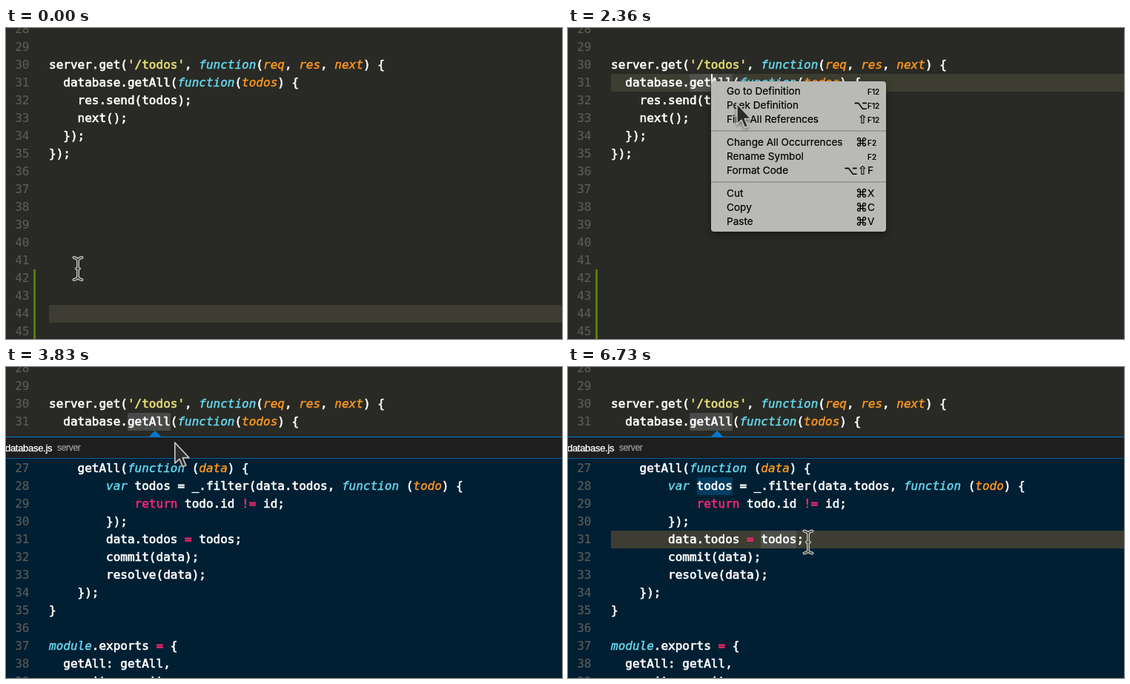
An HTML page for the animation above (6930 ms loop, 750 by 420 pixels).

```html
<!DOCTYPE html>
<html lang="en">
<head>
<meta charset="utf-8">
<title>Peek definition</title>
<style>
  html, body { margin: 0; width: 100%; height: 100%; overflow: hidden; background: #272822; }
  #stage { position: relative; width: 750px; height: 420px; overflow: hidden; background: #292a25; color: #fff;
    font: 16px/24px "DejaVu Sans Mono", "Liberation Mono", monospace; }
  #stage div, #stage svg { position: absolute; }
  .line, .num { white-space: pre; height: 24px; }
  .line { left: 58px; -webkit-text-stroke: .65px currentColor; }
  .num { left: 0; width: 31.5px; text-align: right; color: #5c5c57; -webkit-text-stroke: .15px currentColor; }
  .key { color: #66d9ef; font-style: italic; -webkit-text-stroke: .45px currentColor; }
  .arg { color: #fd971f; font-style: italic; -webkit-text-stroke: .45px currentColor; }
  .op { color: #f92672; -webkit-text-stroke: .65px currentColor; }
  .str { color: #e6db74; -webkit-text-stroke: .65px currentColor; }
  .band { left: 58px; width: 692px; height: 24px; background: #3e3d32; }
  .word { height: 24px; background: rgba(87, 87, 87, .72); }
  .strong { background: rgba(0, 73, 114, .72); }
  .hover { background: rgba(38, 79, 120, .28); }
  .caret { width: 2px; height: 24px; background: #f8f8f0; }
  #bar { left: 37px; top: 326px; width: 3px; height: 94px; background: #587c0c; }
  #peek { left: 0; top: 86px; width: 750px; height: 334px; background: #292a25; }
  #notch { left: 193px; top: 0; border: 8px solid transparent; border-top: 0; border-bottom-color: #007acc; }
  #head { left: 0; top: 8px; width: 750px; height: 28px; background: #1e1e1e; border: solid #007acc; border-width: 1px 0;
    border-bottom-color: #00609f; font: 13px/29px "Liberation Sans", Arial, sans-serif; letter-spacing: -.3px; white-space: pre;
    -webkit-text-stroke: .3px currentColor; }
  #head b { position: absolute; left: -1px; font-weight: 400; color: #fff; }
  #head i { position: absolute; left: 69px; font-style: normal; font-size: 12px; color: #9a9a9a; }
  #body { left: 0; top: 38px; width: 750px; height: 296px; background: #001f33; }
  #tip { left: 183px; top: 195px; width: 40px; height: 25px; border: 1px solid #555; background: #001f33; }
  #tip span { position: absolute; left: 3px; top: 0; }
  #menu { left: 193px; top: 72px; width: 236px; height: 203px; border-radius: 4px; background: #b9b9b5; color: #000;
    box-shadow: 0 4px 11px rgba(0, 0, 0, .38); font: 13.6px/19px Inter, Roboto, sans-serif;
    -webkit-text-stroke: .2px currentColor; }
  .item { left: 0; width: 236px; height: 19px; white-space: pre; }
  .item.lit { background: #0068da; color: #fff; }
  .item span { position: absolute; left: 21px; }
  .item .mod { left: auto; right: 25px; font: 16px/19px "DejaVu Sans", sans-serif; }
  .item .cut { left: 211px; }
  .item .small { font-size: 10px; font-weight: 500; line-height: 20px; }
  .sep { left: 0; width: 236px; height: 2px; background: rgba(0, 0, 0, .17); }
  #arrow, #beam { left: 0; top: 0; overflow: visible; }
  #arrow { filter: drop-shadow(0 2px 2px rgba(0, 0, 0, .4)); }
</style>
</head>
<body>
<div id="stage">
  <div id="bar"></div>
  <div id="row" class="band"></div>
  <div id="match" class="word" style="left:164px;top:62px;width:58px"></div>
  <div id="code"></div>
  <div id="caret" class="caret"></div>
  <div id="peek">
    <div id="notch"></div>
    <div id="head"><b>database.js</b><i>server</i></div>
    <div id="body"></div>
  </div>
  <div id="inner">
    <div id="peekRow" class="band" style="top:221px"></div>
    <div id="hover" class="word hover" style="left:183px;top:221px;width:48px"></div>
    <div id="uses">
      <div class="word strong" style="left:173.5px;top:149px;width:48px"></div>
      <div class="word" style="left:260px;top:221px;width:48px"></div>
    </div>
    <div id="peekNums"></div>
    <div id="peekCode"></div>
    <div id="peekCaret" class="caret" style="left:308px;top:221px"></div>
    <div id="tip"><span class="key">any</span></div>
  </div>
  <div id="menu"></div>
  <svg id="arrow" width="24" height="36">
    <path d="M.8 0V28L7 22.4L11.4 32.6L15.8 30.8L11.4 20.6H20Z" fill="#2c2c2c" stroke="#c4c4c0" stroke-width="1.7" stroke-linejoin="round"/>
  </svg>
  <svg id="beam" width="1" height="1" fill="none" stroke-linecap="round">
    <path id="beamPath" d="M-5.5-15Q-1-14.5 0-11Q1-14.5 5.5-15M0-11V11M-5.5 15Q-1 14.5 0 11Q1 14.5 5.5 15M-2 0H2"/>
  </svg>
</div>
<script>
const LOOP = 6930;
const $ = id => document.getElementById(id);

const CODE = [
  "", "",
  "server.get('/todos', function(~req, ~res, ~next) {",
  "  database.getAll(function(~todos) {",
  "    res.send(todos);",
  "    next();",
  "  });",
  "});",
  "", "", "", "", "", "", "", "", "", ""
];
const PEEK = [
  "    getAll(function (~data) {",
  "        var todos = _.filter(data.todos, function (~todo) {",
  "            return todo.id != id;",
  "        });",
  "        data.todos %= todos;",
  "        commit(data);",
  "        resolve(data);",
  "    });",
  "}",
  "",
  "module.exports %= {",
  "  getAll: getAll,",
  "  commit: commit,"
];

// "~" marks a parameter, "%" an assignment operator
const paint = text => text.replace(/'[^']*'|~\w+|function|var|module|return|!=|%=/g, s => {
  const kind = s[0] === "'" ? "str" : s[0] === "~" ? "arg" : /^(return|!=|%=)$/.test(s) ? "op" : "key";
  return `<span class="${kind}">${s.replace(/[~%]/, "")}</span>`;
});

function add(parent, cls, top, html) {
  const el = document.createElement("div");
  el.className = cls;
  el.style.top = top + "px";
  el.innerHTML = html;
  parent.append(el);
  return el;
}

function listing(lines, first, top, text, nums) {
  lines.forEach((line, i) => {
    add(nums, "num", top + i * 24, first + i);
    add(text, "line", top + i * 24, paint(line));
  });
}
listing(CODE, 28, -10, $("code"), $("code"));
listing(PEEK, 27, 125, $("peekCode"), $("peekNums"));

const MENU = [
  ["Go to Definition", "", "F12", 4],
  ["Peek Definition", "⌥", "F12", 23],
  ["Find All References", "⇧", "F12", 42],
  ["Change All Occurrences", "⌘", "F2", 73],
  ["Rename Symbol", "", "F2", 92],
  ["Format Code", "⌥⇧", "F", 111],
  ["Cut", "⌘", "X", 142],
  ["Copy", "⌘", "C", 161],
  ["Paste", "⌘", "V", 180]
];
const items = MENU.map(([label, mod, key, top]) => add($("menu"), "item", top,
  `<span>${label}</span><span class="mod">${mod}</span><span class="cut${key.length > 1 ? " small" : ""}">${key}</span>`));
[66, 135].forEach(top => add($("menu"), "sep", top, ""));

// light outline around a dark core
const core = $("beamPath");
const halo = core.cloneNode();
halo.removeAttribute("id");
halo.setAttribute("stroke", "#c9c9c5");
halo.setAttribute("stroke-width", 4);
core.setAttribute("stroke", "#3b3b3b");
core.setAttribute("stroke-width", 1.4);
$("beam").prepend(halo);

// time, x, y of the pointer
const PATH = [
  [0, 97, 325], [30, 97, 325], [700, 189.5, 79], [960, 189.5, 79], [1100, 193, 73],
  [1430, 193, 73], [1930, 227, 102], [2360, 227, 102], [2530, 224, 102], [2600, 224, 102],
  [2900, 227, 102], [3830, 227, 102], [4500, 213, 239], [4530, 213, 239], [4700, 198, 239.5],
  [5130, 198, 239.5], [5530, 310, 238], [6030, 310, 238], [6300, 321.5, 235],
  [6600, 321.5, 235], [6730, 324, 236.5], [LOOP, 324, 236.5]
];

function pointer(t) {
  const i = PATH.findIndex(p => p[0] > t);
  const [t0, x0, y0] = PATH[i - 1], [t1, x1, y1] = PATH[i];
  const u = (t - t0) / (t1 - t0), e = u * u * (3 - 2 * u);
  return [x0 + (x1 - x0) * e, y0 + (y1 - y0) * e];
}

const show = (id, on) => { $(id).style.display = on ? "" : "none"; };
const place = (el, x, y) => { el.style.transform = `translate(${x}px, ${y}px)`; };

function render(t) {
  const within = (a, b = LOOP) => t >= a && t < b;
  const [x, y] = pointer(t);
  const clicked = t >= 800;

  show("row", t < 2760);
  $("row").style.top = (clicked ? 62 : 374) + "px";
  show("match", t >= 960);
  show("caret", within(330, 2760));
  $("caret").style.left = (clicked ? 193 : 58) + "px";
  $("caret").style.top = (clicked ? 62 : 374) + "px";

  show("menu", within(1200, 2700));
  $("menu").style.opacity = Math.min(1, 1 - (t - 2490) / 200);
  const flash = within(2360, 2430);
  const hit = y >= 95 ? 1 : y >= 76 ? 0 : -1;
  items.forEach((el, i) => el.classList.toggle("lit", i === hit && !flash));

  show("peek", t >= 2760);
  show("inner", t >= 2900);
  show("peekNums", t >= 3060);
  show("hover", within(5030, 5230));
  show("tip", within(5030, 5230));
  show("peekRow", t >= 5830);
  show("uses", t >= 6060);
  show("peekCaret", within(5830, 6300));

  const arrow = t >= 1100 && t < 4500 && y < 124;
  show("arrow", arrow);
  show("beam", !arrow);
  place($("arrow"), x, y);
  place($("beam"), x, y);
}

const start = performance.now();
function tick() {
  render((performance.now() - start) % LOOP);
  requestAnimationFrame(tick);
}
tick();
</script>
</body>
</html>
```
